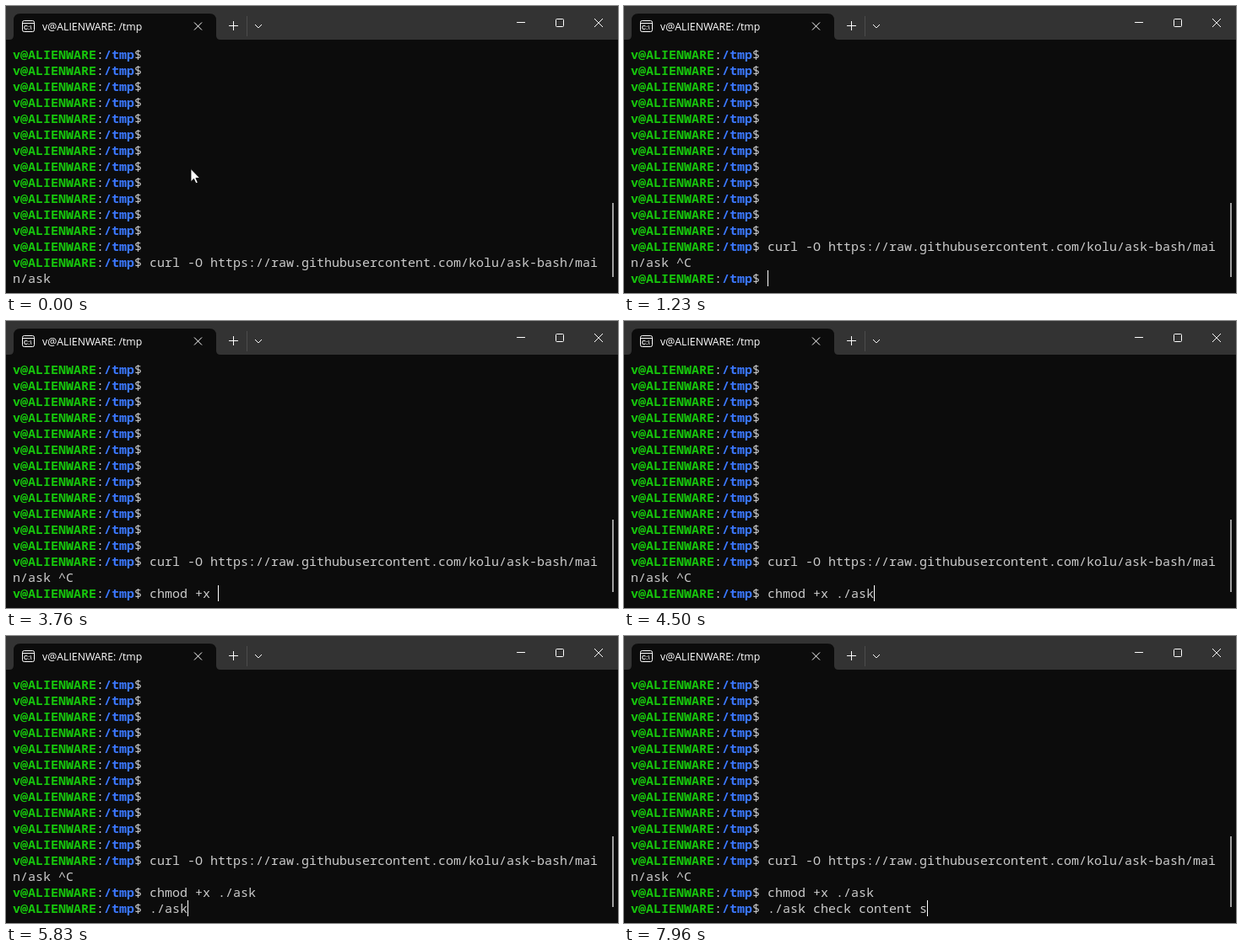
Recreate the animation shown at these times as an HTML page. Size 725 by 341 pixels, loop 8000 ms.

```html
<!DOCTYPE html>
<html lang="en">
<head>
<meta charset="utf-8">
<title>Terminal</title>
<style>
html, body { margin: 0; width: 100%; height: 100%; overflow: hidden; background: #0c0c0c; }
svg, pre { position: absolute; left: 0; top: 0; }
pre {
  left: 8px; top: 48px; margin: 0; color: #ccc;
  font: 15px/19px "Noto Sans Mono", "DejaVu Sans Mono", monospace;
  font-variant-ligatures: none;
}
b { font-weight: 700; color: #16c60c; }
b + b, i { color: #3b78ff; font-style: normal; font-weight: 700; }
</style>
</head>
<body>
<svg width="725" height="341" viewBox="0 0 725 341">
  <path fill="#333" d="M0 0H725V40H0Z"/>
  <path fill="#0c0c0c" d="M4 40Q9 40 9 35V17Q9 9 17 9H241Q249 9 249 17V35Q249 40 254 40Z"/>
  <g fill="none" stroke="#fff">
    <rect x="19.5" y="17.5" width="14" height="13" rx="2"/>
    <path d="M20 20.5H33"/>
    <path d="M223 19.5L232 28.5M232 19.5L223 28.5"/>
    <path d="M264 23.5H275M269.5 18V29"/>
    <path d="M295 22L299 26L303 22"/>
    <path d="M605 19.5H615"/>
    <rect x="651.5" y="15.5" width="9" height="9" rx="1"/>
    <path d="M697 15L707 25M707 15L697 25"/>
  </g>
  <path stroke="#4c4c4c" d="M285.5 12V36"/>
  <text x="21" y="28" fill="#fff" font-family="Liberation Sans, sans-serif" font-size="7" font-weight="700">C:\</text>
  <text x="43" y="29" fill="#fff" font-family="Open Sans, Noto Sans, sans-serif" font-size="12.3">v@ALIENWARE: /tmp</text>
</svg>
<pre id="screen"></pre>
<svg width="725" height="341" viewBox="0 0 725 341">
  <rect id="thumb" x="718" width="2" fill="#9f9f9f"/>
  <rect id="caret" y="314" width="1" height="19" fill="#fff"/>
  <path id="pointer" fill="#fff" stroke="#000" stroke-width=".8"
    d="M219 193.500V208.700L222.500 205.400L225 210.800L227.300 209.700L224.900 204.500H229.700Z"/>
</svg>
<script>
const $ = id => document.getElementById(id);
const PROMPT = "<b>v@ALIENWARE</b>:<i>/tmp</i>$ ";
const ROWS = 15, CELL = 9, LEFT = 8, PROMPT_CELLS = 18;
const URL_ROWS = ["curl -O https://raw.githubusercontent.com/kolu/ask-bash/mai", "n/ask "];
const INTERRUPT = 1230, ENTER = 4760;

// Key times for each command; a repeated time is two keys at once.
const chmod = {
  text: "chmod +x ./ask",
  keys: [2370, 2430, 2630, 2960, 3030, 3160, 3430, 3630, 3760, 4100, 4100, 4300, 4360, 4500]
};
const ask = {
  text: "./ask check content s",
  keys: [5430, 5500, 5560, 5700, 5830, 6030, 6430, 6500, 6600, 6700, 6760, 6960,
         7160, 7230, 7430, 7530, 7630, 7630, 7730, 7830, 7960]
};
const typed = (cmd, t) => cmd.text.slice(0, cmd.keys.filter(k => k <= t).length);
const show = (id, on) => $(id).setAttribute("visibility", on ? "visible" : "hidden");

let shown = "";
function draw(t) {
  const stopped = t >= INTERRUPT, entered = t >= ENTER;
  const lines = [PROMPT + URL_ROWS[0], URL_ROWS[1] + (stopped ? "^C" : "")];
  let column = URL_ROWS[1].length;
  if (stopped) {
    const input = typed(entered ? ask : chmod, t);
    if (entered) lines.push(PROMPT + chmod.text);
    lines.push(PROMPT + input);
    column = PROMPT_CELLS + input.length;
  }
  while (lines.length < ROWS) lines.unshift(PROMPT);

  const html = lines.join("\n");
  if (html !== shown) $("screen").innerHTML = shown = html;

  $("caret").setAttribute("x", LEFT + column * CELL);
  show("caret", t >= 500);
  show("pointer", t < INTERRUPT || (t >= 1760 && t < 2300));

  // The scrollbar follows each new line one step late.
  const top = 234 + (t >= 1300 ? 2 : 0) + (t >= 4830 ? 2 : 0);
  $("thumb").setAttribute("y", top);
  $("thumb").setAttribute("height", 322 - top);
}

const start = performance.now();
function tick() {
  draw((performance.now() - start) % 8000);
  requestAnimationFrame(tick);
}
tick();
</script>
</body>
</html>
```
